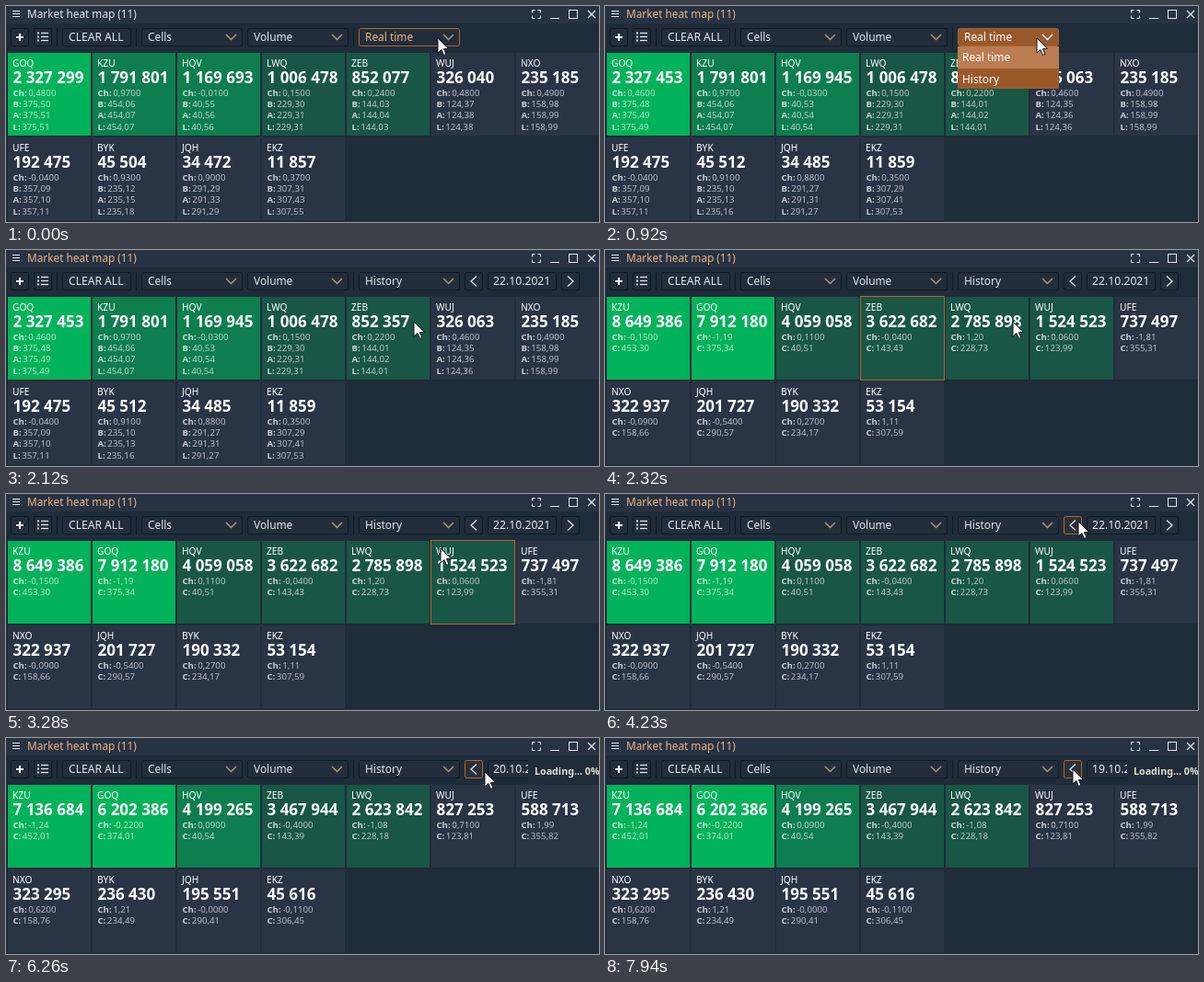
An HTML page with a canvas for the animation above (8 s loop, 644 px wide and 235 px high).

```html
<!DOCTYPE html>
<html lang="en">
<head>
<meta charset="utf-8">
<title>Market heat map</title>
<style>
html, body { margin: 0; width: 100%; height: 100%; overflow: hidden; background: #1f2c39; }
canvas { display: block; width: 644px; height: 235px; }
</style>
</head>
<body>
<canvas id="stage" width="644" height="235"></canvas>
<script>
const LOOP = 8000;
const ctx = document.getElementById('stage').getContext('2d');
const FONT = '"Noto Sans", "Open Sans", sans-serif';
const ORANGE = '#b4652f', PEACH = '#f0b27e', INK = '#e2e5e8', PANEL = '#1f2c39', EDGE = '#101923';

// Symbol, bid price, volume now, then volume on each day going back
const stocks = `
  GOQ 375.50 2327299 7912180 5685232 6202386
  KZU 454.06 1791801 8649386 5966427 7136684
  HQV 40.55 1169693 4059058 2891279 4199265
  LWQ 229.30 1006478 2785898 2752005 2623842
  ZEB 144.03 852077 3622682 3844507 3467944
  WUJ 124.37 326040 1524523 795032 827253
  NXO 158.98 235185 322937 412063 323295
  UFE 357.09 192475 737497 448684 588713
  BYK 235.12 45504 190332 171898 236430
  JQH 291.29 34472 201727 180610 195551
  EKZ 307.31 11857 53154 59661 45616`.trim().split('\n').map(row => {
  const [symbol, price, ...volumes] = row.trim().split(' ');
  return { symbol, price: +price, volumes: volumes.map(Number) };
});

const noise = seed => {
  const n = Math.sin(seed * 12.9898) * 43758.5453;
  return n - Math.floor(n);
};
const money = n => n.toFixed(2).replace('.', ',');
const change = n => money(n) + (Math.abs(n) < 1 ? '00' : '');
const grouped = n => String(n).replace(/\B(?=(\d{3})+$)/g, ' ');

function heatColor(share) {
  if (share > .8) return '#00b259';
  if (share > .495) return '#0e7e4e';
  return share > .15 ? '#195645' : '#293445';
}

function liveQuote(stock, i, ticked) {
  const traded = ticked && noise(i + 1) > .4;
  const volume = stock.volumes[0] + (traded ? Math.round(stock.volumes[0] * .0004 * noise(i + 7)) : 0);
  const bid = stock.price - (traded ? .02 : 0);
  const spread = Math.max(1, Math.round(140000 / volume)) / 100;
  const last = bid + spread * (1 + Math.round(noise(i + 3) * 2 - 1));
  const diff = stock.price * .005 * (noise(i + 5) - .2) - (traded ? .02 : 0);
  return { symbol: stock.symbol, volume,
    values: [['Ch:', change(diff)], ['B:', money(bid)], ['A:', money(bid + spread)], ['L:', money(last)]] };
}

function dayQuote(stock, i, day) {
  const seed = day * 20 + i;
  const close = stock.price * (.998 + .006 * (noise(seed) - .5));
  const diff = stock.price * .012 * (noise(seed + .5) - .45);
  return { symbol: stock.symbol, volume: stock.volumes[day],
    values: [['Ch:', change(diff)], ['C:', money(close)]] };
}

// Cells are ordered and coloured by volume
function board(quote, option) {
  const cells = stocks.map((stock, i) => quote(stock, i, option)).sort((a, b) => b.volume - a.volume);
  cells.forEach(cell => cell.color = heatColor(cell.volume / cells[0].volume));
  return cells;
}

const boards = [
  [0, board(liveQuote, false)], [390, board(liveQuote, true)],
  [2250, board(dayQuote, 1)], [4300, board(dayQuote, 2)], [6130, board(dayQuote, 3)]
];
const days = [[0, 0], [2120, 22], [4300, 21], [6130, 20], [7480, 19]];
const moves = [ // from, to, x, y
  [0, 0, 469, 35], [1390, 1590, 451, 66], [1590, 1790, 443, 78], [3000, 3700, 514, 30],
  [4700, 4910, 537, 40], [5400, 5450, 531, 36], [5450, 5920, 509, 32],
  [6060, 6200, 520, 37], [6280, 6610, 534, 36], [7070, 7210, 508, 34]
];

const at = (steps, t) => steps.filter(s => s[0] <= t).pop()[1];
const within = (t, from, to) => t >= from && t < to;

function mouseAt(t) {
  let x = 0, y = 0;
  for (const [from, to, toX, toY] of moves) {
    if (t < from) break;
    const k = Math.min(1, (t - from) / (to - from || 1) + (to === from));
    x += (toX - x) * k;
    y += (toY - y) * k;
  }
  return [Math.round(x), Math.round(y)];
}

function hoverAt(t, [x, y]) {
  if (within(t, 790, 2320)) return '';
  if (within(t, 2320, 3000)) return 3;
  if (within(t, 5920, 6300)) return 'prev';
  if (y > 50) return Math.floor((x - 1) / 92);
  if (y < 24 || y > 44) return '';
  if (x >= 383 && x < 493) return 'mode';
  if (x >= 498 && x < 519) return 'prev';
  return x >= 523 && x < 598 ? 'date' : '';
}

function fill(x, y, w, h, color) {
  ctx.fillStyle = color;
  ctx.fillRect(x, y, w, h);
}

function text(str, x, y, size, color = INK, weight = 400) {
  ctx.font = `${weight} ${size}px ${FONT}`;
  ctx.fillStyle = color;
  ctx.fillText(str, x, y);
  return ctx.measureText(str).width;
}

function line(points, color = INK, width = 1) {
  ctx.beginPath();
  points.forEach(([x, y]) => ctx.lineTo(x, y));
  ctx.strokeStyle = color;
  ctx.lineWidth = width;
  ctx.stroke();
}

function box(x, w, border = EDGE, color = '#222e3c') {
  ctx.beginPath();
  ctx.roundRect(x + .5, 24.5, w - 1, 19, 2);
  ctx.fillStyle = color;
  ctx.fill();
  ctx.strokeStyle = border;
  ctx.lineWidth = 1;
  ctx.stroke();
}

function select(x, label, { border, color, ink, arrow = '#ad9778' } = {}) {
  box(x, 110, border, color);
  text(label, x + 7, 38, 11.9, ink);
  line([[x + 92, 31], [x + 97.5, 36.5], [x + 103, 31]], arrow, 1.5);
}

function arrowButton(x, dir, hovered) {
  box(x, 20, hovered ? ORANGE : EDGE, hovered ? '#2c303a' : undefined);
  const mid = x + 10;
  line([[mid - 3 * dir, 28.5], [mid + 3 * dir, 34], [mid - 3 * dir, 39.5]], INK, 1.3);
}

function titleBar(t) {
  fill(0, 0, 644, 19, '#273343');
  [5.5, 8.5, 11.5].forEach(y => line([[7, y], [15, y]]));
  text('Market heat map (11)', 23, 13, 11.8, t < 790 ? INK : PEACH);
  for (const [x, dx] of [[571.5, 3], [580.5, -3]])
    for (const [y, dy] of [[4.5, 3], [13.5, -3]])
      line([[x + dx, y], [x, y], [x, y + dy]]);
  line([[591, 13.5], [601, 13.5]]);
  ctx.strokeRect(611.5, 4.5, 9, 9);
  line([[632, 5], [640, 13]], INK, 1.2);
  line([[640, 5], [632, 13]], INK, 1.2);
}

function modeStyle(t, hover) {
  if (within(t, 790, 2120)) return { border: '#a5622f', color: '#98582b', ink: '#fff', arrow: '#fff' };
  return hover === 'mode' ? { border: ORANGE, ink: PEACH } : {};
}

function toolbar(t, hover) {
  box(5, 20);
  line([[11, 34], [19, 34]], '#fff', 2);
  line([[15, 30], [15, 38]], '#fff', 2);
  box(30, 20);
  [29.5, 33.5, 37.5].forEach(y => {
    fill(34, y - 1, 2, 2, INK);
    line([[38, y], [46, y]], INK, 1.3);
  });
  box(61, 75);
  text('CLEAR ALL', 68, 38, 12.1);
  [55, 141, 377].forEach(x => fill(x, 24, 1, 20, EDGE));
  select(147, 'Cells');
  select(262, 'Volume');
  select(383, t < 2120 ? 'Real time' : 'History', modeStyle(t, hover));

  const day = at(days, t);
  if (!day) return;
  arrowButton(498, -1, hover === 'prev');
  box(523, 75, hover === 'date' ? '#8b7b70' : EDGE);
  text(`${day}.10.2021`, 529, 38, 12.2);
  arrowButton(603, 1, false);
  if (within(t, 6190, 6540) || t >= 7550) {
    fill(567, 22, 77, 25, PANEL);
    text('Loading... 0%', 574, 40, 10.7, '#e6ddd2', 700);
  }
}

function drawCell({ color, symbol, volume, values }, i, hover) {
  const x = 2 + i % 7 * 92, y = i < 7 ? 51 : 143;
  fill(x, y, 90, 90, color);
  text(symbol, x + 5, y + 14.5, 10.2, '#fff', 500);
  text(grouped(volume), x + 5.5, y + 33, 17, '#fff', 600);
  values.forEach(([label, value], row) => {
    const base = y + 46.5 + row * 12.4;
    const w = text(label, x + 5.5, base, 9.6, 'rgba(255,255,255,.76)', 700);
    text(value, x + 7 + w, base, 9.7, 'rgba(255,255,255,.68)');
  });
  if (hover === i) {
    ctx.strokeStyle = ORANGE;
    ctx.lineWidth = 1;
    ctx.strokeRect(x - .5, y - .5, 91, 91);
  }
}

function dropdown(t, mouseY) {
  if (!within(t, 790, 2120)) return;
  ctx.save();
  ctx.beginPath();
  ctx.rect(383, 44, 110, 48 * Math.min(1, (t - 720) / 210));
  ctx.clip();
  const active = mouseY < 68 ? 0 : 1;
  ['Real time', 'History'].forEach((label, i) => {
    fill(383, 44 + i * 24, 110, 24, i === active ? '#bb7c51' : '#9b592a');
    text(label, 388, 60 + i * 24, 11.9, '#fff');
  });
  ctx.restore();
}

function cursor([x, y]) {
  ctx.beginPath();
  [[0, 0], [0, 16], [3.8, 12.5], [6.5, 18.5], [9, 17.4], [6.4, 11.6], [11.5, 11.4]]
    .forEach(([dx, dy]) => ctx.lineTo(x + dx, y + dy));
  ctx.closePath();
  ctx.fillStyle = '#fff';
  ctx.fill();
  ctx.strokeStyle = '#14181d';
  ctx.lineWidth = 1;
  ctx.stroke();
}

function render(t) {
  const mouse = mouseAt(t), hover = hoverAt(t, mouse);
  fill(0, 0, 644, 235, PANEL);
  titleBar(t);
  toolbar(t, hover);
  at(boards, t).forEach((cell, i) => drawCell(cell, i, hover));
  dropdown(t, mouse[1]);
  cursor(mouse);
}

const start = performance.now();
function tick() {
  render((performance.now() - start) % LOOP);
  requestAnimationFrame(tick);
}
tick();
</script>
</body>
</html>
```
